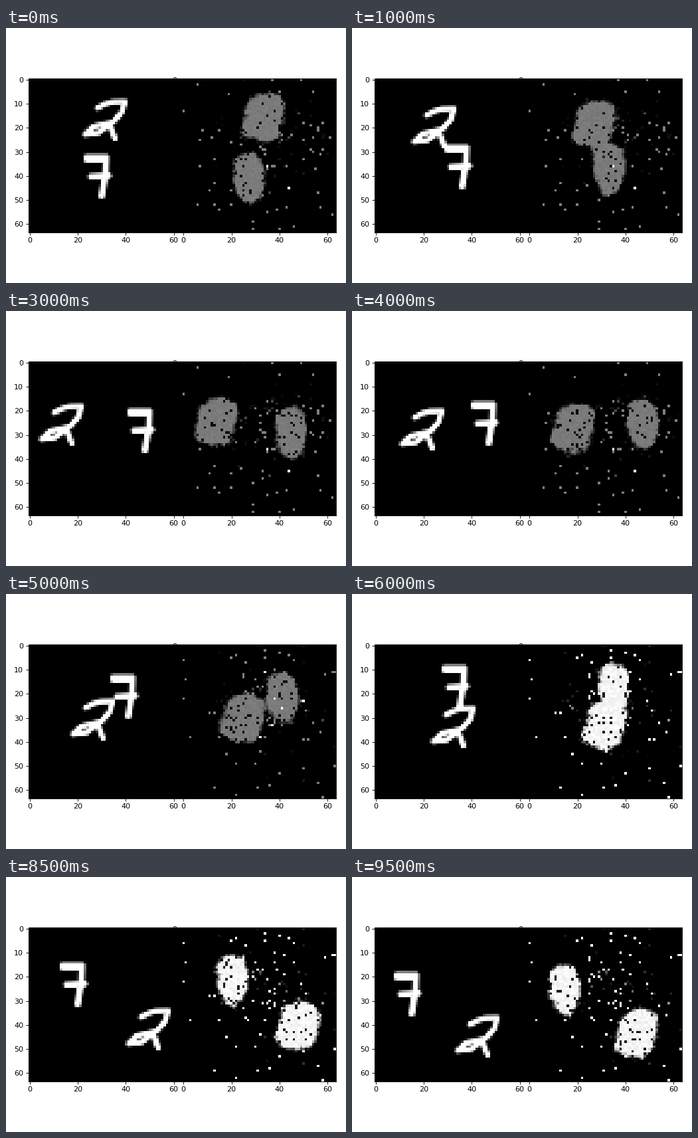
A matplotlib script that plays this animation: 512 px wide and 384 px high, repeating every 10 s.

```python
import numpy as np
import matplotlib.pyplot as plt
from matplotlib.animation import FuncAnimation

FRAMES, N = 20, 64
SWITCH = 10  # the noise pattern changes here; the peaks vanish one step later
ROWS, COLS = np.mgrid[0:N, 0:N] + 0.5

# Pen strokes as key points, measured from the digit's top left corner
TWO = [[(6.8, 4.2), (10, 2.6), (13, 1.7), (18, 1.6), (16.6, 6.2), (13.4, 9.8),
        (7, 14.6), (1.6, 15.2), (5, 12), (11.5, 10.5), (13.9, 16.9)]]
SEVEN = [[(1.2, 1.8), (9.2, 1.8), (9, 8), (7.4, 17.8)],
         [(1.2, 2.6), (9, 2.6)],
         [(2.9, 9.8), (10.2, 9.4)]]


def bounce(p, lo, hi):
    span = hi - lo
    q = (p - lo) % (2 * span)
    return lo + min(q, 2 * span - q)


def corner_two(t):
    return bounce(22.1 - 3.29 * t, 3.2, 40.12), 8.3 + 1.46 * t


def corner_seven(t):
    return bounce(23.9 + 2.92 * t, 0, 43.69), bounce(31.5 - 1.925 * t, 6.475, 60)


def draw_digit(strokes, corner, reach):
    x, y = COLS - int(corner[0]), ROWS - int(corner[1])
    dist = np.full((N, N), 99.0)
    for pts in strokes:
        for (ax, ay), (bx, by) in zip(pts, pts[1:]):
            dx, dy = bx - ax, by - ay
            s = np.clip(((x - ax) * dx + (y - ay) * dy) / (dx * dx + dy * dy), 0, 1)
            dist = np.minimum(dist, np.hypot(x - ax - s * dx, y - ay - s * dy))
    return np.clip((reach - dist) / 0.8, 0, 1)


def draw_two(t):
    return draw_digit(TWO, corner_two(t), 1.55)


def draw_seven(t):
    return draw_digit(SEVEN, corner_seven(t), 1.7)


def blur(img, sigma):
    r = np.arange(-6, 7)
    kernel = np.exp(-r ** 2 / (2 * sigma ** 2))
    kernel /= kernel.sum()
    for axis in (0, 1):
        img = np.apply_along_axis(np.convolve, axis, img, kernel, mode="same")
    return img


def blob(draw, corner, t, center, radii):
    """A soft filled shape that trails a little behind its digit."""
    x, y = corner(t - 0.6)
    d = (((COLS - x - center[0]) / radii[0]) ** 2
         + ((ROWS - y - center[1]) / radii[1]) ** 2)
    trail = (draw(t) + draw(t - 1)) / 2
    return 0.55 * blur(trail, 1.5) + 0.5 * np.exp(-d ** 2)


def noise_pattern(seed):
    """Sparse cells over the whole field, more of them and dimmer ones mid-field."""
    rng = np.random.RandomState(seed)
    img = np.zeros((N, N))

    def middle(count, spread):
        return np.clip(rng.normal((26, 37), spread, (count, 2)), 0, N - 1).astype(int).T

    for count, spread, lo, hi in ((50, 12, 0.03, 0.2), (12, 8, 0.3, 0.6), (32, 10, 1, 1)):
        img[tuple(middle(count, spread))] = rng.uniform(lo, hi, count)
    img[tuple(rng.randint(0, N, (2, 40)))] = 1
    return img, middle(6, 7)


EARLY, _ = noise_pattern(3)
LATE, LATE_PEAKS = noise_pattern(8)
EARLY_PEAKS = np.array([(36, 45), (35, 44)])
HOLES = np.random.RandomState(5).rand(N, N) < 0.07


def response(t):
    rng = np.random.RandomState(100 + t)
    field = np.maximum(blob(draw_two, corner_two, t, (10, 9), (9, 11)),
                       blob(draw_seven, corner_seven, t, (5.5, 9), (7, 11)))
    field += rng.normal(0, 0.03, (N, N)) + blur(rng.normal(0, 0.12, (N, N)), 1)
    body = np.clip((field - 0.22) / 0.16, 0, 1) * (1 - 0.08 * rng.rand(N, N))
    body[HOLES | (rng.rand(N, N) < 0.02)] *= 0.1

    noise = LATE if t >= SWITCH else EARLY
    if t == SWITCH - 1:
        noise = np.where(rng.rand(N, N) < 0.5, EARLY, LATE)
    img = np.maximum(body, noise)
    if t <= SWITCH:
        img *= 0.5
        img[tuple(LATE_PEAKS if t == SWITCH else EARLY_PEAKS)] = 1
    return img


def make_panel(left, side=231.4):
    ax = fig.add_axes([left / 512, 0.5 - side / 768, side / 512, side / 384])
    im = ax.imshow(np.zeros((N, N)), cmap="gray", vmin=0, vmax=1,
                   interpolation="nearest", aspect="auto")
    ax.set_xticks(range(0, 61, 20))
    ax.set_yticks(range(0, 61, 10))
    return im


def update(t):
    digits.set_data(np.clip(draw_two(t) + draw_seven(t), 0, 1))
    activity.set_data(response(t))
    return digits, activity


fig = plt.figure(figsize=(6.4, 4.8), dpi=80)
digits = make_panel(34.0)
activity = make_panel(265.4)
anim = FuncAnimation(fig, update, frames=FRAMES, interval=500, repeat=True,
                     repeat_delay=0, blit=False)
plt.show()
```
